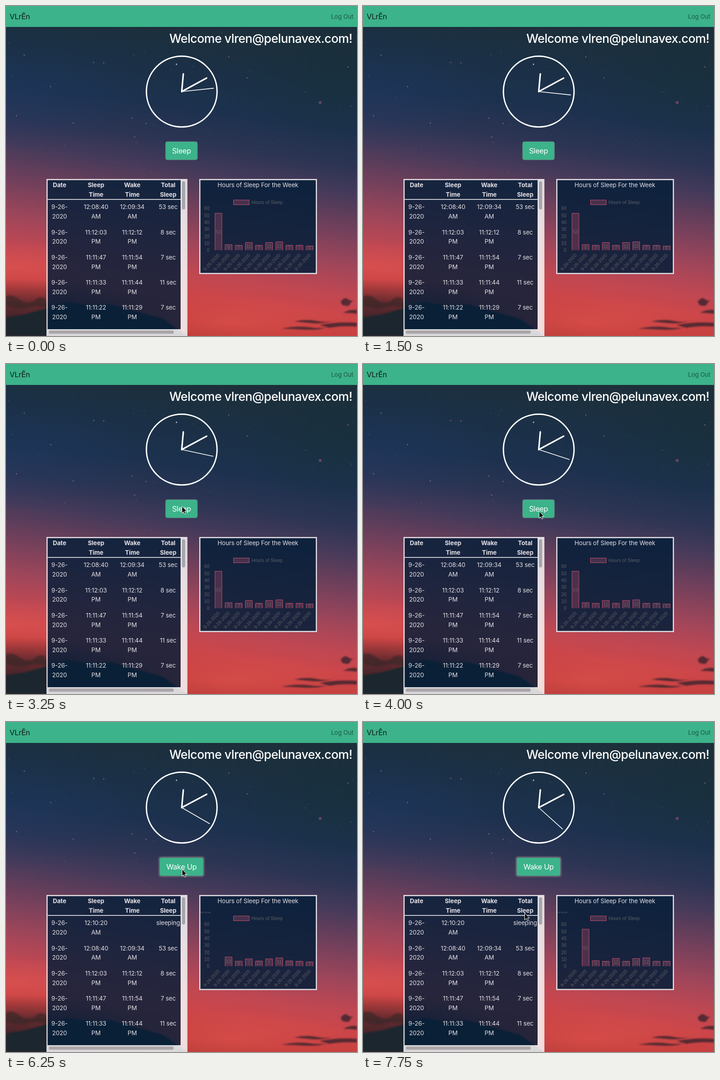
An HTML page for the animation above (8 s loop, 772 by 725 pixels).

```html
<!DOCTYPE html>
<html lang="en">
<head>
<meta charset="utf-8">
<title>Sleep log</title>
<style>
html, body { margin: 0; width: 100%; height: 100%; overflow: hidden; background: #1d2f3d; }
svg { display: block; width: 772px; height: 725px; font: 13.3px Inter, sans-serif; font-optical-sizing: none; letter-spacing: -.1px; }
.mid { text-anchor: middle; }
.end { text-anchor: end; }
.head { font-weight: 700; }
.big { font-size: 16.3px; letter-spacing: -.35px; }
.hello { font-size: 26.7px; font-weight: 500; letter-spacing: -.55px; }
.chart { font: 10.35px "Liberation Sans", Arial, sans-serif; letter-spacing: 0; fill: #666; fill-opacity: .88; }
.bar { fill: #ff6384; fill-opacity: .22; stroke: #dc5775; stroke-opacity: .9; stroke-width: .95; }
.hands { stroke: #fff; stroke-linecap: round; }
</style>
</head>
<body>
<svg viewBox="0 0 772 725">
  <defs>
    <linearGradient id="sky" gradientUnits="userSpaceOnUse" x1="386" y1="47" x2="286" y2="725">
      <stop offset="0" stop-color="#1c2f3b"/>
      <stop offset=".12" stop-color="#1b3045"/>
      <stop offset=".25" stop-color="#1c314e"/>
      <stop offset=".36" stop-color="#2c3453"/>
      <stop offset=".45" stop-color="#453a5a"/>
      <stop offset=".57" stop-color="#74405b"/>
      <stop offset=".68" stop-color="#a0465a"/>
      <stop offset=".77" stop-color="#bf4752"/>
      <stop offset=".84" stop-color="#cc4649"/>
      <stop offset=".92" stop-color="#c63f3d"/>
      <stop offset="1" stop-color="#b03835"/>
    </linearGradient>
    <radialGradient id="blue"><stop stop-color="#1c3a66" stop-opacity=".4"/><stop offset="1" stop-color="#1c3a66" stop-opacity="0"/></radialGradient>
    <radialGradient id="teal"><stop stop-color="#17303c" stop-opacity=".6"/><stop offset="1" stop-color="#17303c" stop-opacity="0"/></radialGradient>
    <radialGradient id="glow"><stop stop-color="#e85c55" stop-opacity=".4"/><stop offset="1" stop-color="#e85c55" stop-opacity="0"/></radialGradient>
    <radialGradient id="dusk"><stop stop-color="#2a2027" stop-opacity=".9"/><stop offset=".5" stop-color="#35222a" stop-opacity=".65"/><stop offset="1" stop-color="#4a2730" stop-opacity="0"/></radialGradient>
    <filter id="soft" x="-30%" y="-60%" width="160%" height="220%"><feGaussianBlur stdDeviation="1.5"/></filter>
    <clipPath id="plot"><rect x="428" y="416.7" width="253" height="169"/></clipPath>
  </defs>

  <rect width="772" height="725" fill="url(#sky)"/>
  <ellipse cx="40" cy="200" rx="260" ry="120" fill="url(#blue)"/>
  <ellipse cx="740" cy="160" rx="240" ry="150" fill="url(#teal)"/>
  <ellipse cx="20" cy="570" rx="200" ry="55" fill="url(#glow)"/>
  <ellipse cx="500" cy="695" rx="260" ry="60" fill="url(#glow)"/>
  <g id="stars"></g>
  <ellipse cx="20" cy="700" rx="330" ry="100" fill="url(#dusk)"/>
  <g filter="url(#soft)">
    <path d="M0 638Q14 632 30 645T62 648Q72 636 86 642L92 664Q64 656 48 662T0 658Z" fill="#35242a" opacity=".6"/>
    <path d="M0 684L40 678L90 664L135 650L175 657L230 655L290 672L345 687L399 725H0Z" fill="#1f272d"/>
    <g fill="#43262f" opacity=".85">
      <path d="M736 650Q744 638 752 644T765 646Q758 651 756 656T740 657Z"/>
      <path d="M634 693Q660 687 684 692T728 689Q700 699 676 697T634 693Z"/>
      <path d="M606 709Q640 702 668 706T712 704Q690 713 656 711T606 709Z"/>
      <path d="M690 701Q726 693 772 696V704Q736 702 712 707Z"/>
      <path d="M742 674Q756 666 772 668V676Q758 674 742 674Z"/>
    </g>
  </g>

  <rect width="772" height="46" fill="#3cb38a"/>
  <text x="8" y="28.5" class="big" fill="#111b18">VLrĔn</text>
  <text x="764" y="27.7" class="end" fill="#1d5744">Log Out</text>
  <text x="761.5" y="81" class="end hello" fill="#fff">Welcome vlren@pelunavex.com!</text>

  <circle cx="386.5" cy="188" r="77.7" fill="none" stroke="#fff" stroke-width="3"/>
  <g class="hands" id="hands"></g>
  <g id="button"></g>

  <rect x="91.5" y="382.5" width="292.5" height="327.5" fill="#071f3a" fill-opacity=".84"/>
  <path d="M89 380H399V725H89ZM91.5 382.5V710H384V382.5Z" fill="#fafafa" fill-opacity=".85" fill-rule="evenodd"/>
  <path d="M396.6 382V722.5H91.5" fill="none" stroke="#cfc6ca" stroke-opacity=".5" stroke-width=".8"/>
  <rect x="94" y="713" width="275" height="7" rx="3.5" fill="#aca5a9"/>
  <rect id="thumb" x="387" y="385" width="7" height="62" rx="3.5" fill="#a7a5ac"/>
  <rect x="91.5" y="424" width="292.5" height="1.8" fill="#d7d9de"/>
  <g id="table" class="mid" fill="#e4e0e5"></g>

  <rect x="426.3" y="381.3" width="256.4" height="206.4" fill="#071f3a" fill-opacity=".88" stroke="#e0dce1" stroke-width="2.6"/>
  <text x="554" y="398.3" class="mid" fill="#e4e0e5">Hours of Sleep For the Week</text>
  <g class="chart" clip-path="url(#plot)">
    <rect x="500.4" y="426.2" width="34.6" height="10.4" class="bar"/>
    <text x="540" y="435">Hours of Sleep</text>
    <g id="axes"></g>
    <g id="bars"></g>
  </g>
  <path id="cursor" d="M0 0V15.3L3.5 12.1L5.8 17.3L8.4 16.2L6.1 11.1H10.8Z" fill="#0a0a0a" stroke="#fff" stroke-width="1" stroke-linejoin="round"/>
</svg>
<script>
const LOOP = 8000, STEP = 250, WAKE = 6250;
const el = id => document.getElementById(id);
const text = (x, y, s, attrs = "") => `<text x="${x}" y="${y}" ${attrs}>${s}</text>`;

const before = [53, 8, 7, 11, 7, 11, 12, 7, 7, 6];
const after = [null, ...before.slice(0, 9)];
const barX = i => 459.7 + i * 22.27;
const barY = v => 536.5 - v * 1.533;

const sleeps = [
  ["12:10:20 AM", "", "sleeping"],
  ["12:08:40 AM", "12:09:34 AM", "53 sec"],
  ["11:12:03 PM", "11:12:12 PM", "8 sec"],
  ["11:11:47 PM", "11:11:54 PM", "7 sec"],
  ["11:11:33 PM", "11:11:44 PM", "11 sec"],
  ["11:11:22 PM", "11:11:29 PM", "7 sec"]
];
const columns = [117.7, 198, 277.7, 356.7];

// Pointer stops: start time, x, y
const stops = [
  [2250, 700.5, 550], [2500, 521.5, 625.5], [2750, 405.5, 474.5], [3000, 330, 278.5],
  [3250, 387, 312.5], [3500, 387.3, 325.5], [3750, 387.3, 325], [4000, 387.3, 323.5],
  [7250, 383, 338], [7500, 372.5, 371.5], [7750, 355.5, 419.5]
];

function drawStars() {
  let seed = 11;
  const rnd = () => (seed = seed * 16807 % 2147483647) / 2147483647;
  const dot = (x, y, r, c, o) => `<circle cx="${x}" cy="${y}" r="${r}" fill="${c}" opacity="${o}"/>`;
  let out = "";
  for (let i = 0; i < 110; i++)
    out += dot(rnd() * 772, 50 + rnd() * 320, .4 + rnd() * .5, "#c3a8b8", .15 + rnd() * .3);
  const bright = [[40, 108], [193, 124], [215, 125], [277, 246], [283, 288], [23, 241], [752, 134],
    [490, 112], [530, 158], [98, 177], [148, 257], [308, 258]];
  bright.forEach(([x, y]) => out += dot(x, y, 1.2, "#c78a98", .65));
  out += dot(375, 128, 1.5, "#a9c9ff", 1) + dot(691, 212, 3.2, "#a5587c", .55);
  el("stars").innerHTML = out;
}

function drawAxes() {
  let out = "";
  for (let v = 0; v <= 60; v += 10) out += text(447.5, barY(v) + 3.7, v, 'class="end"');
  for (let i = 0; i < 10; i++)
    out += text(0, 3.6, "9-26-2020", `class="end" transform="translate(${barX(i) + 8.3} 545.5) rotate(-47)"`);
  el("axes").innerHTML = out;
}

function drawHands(t) {
  const sec = 14 + Math.floor((t + 500) / 1000);
  const min = 10 + sec / 60;
  const hand = (deg, len, w) =>
    `<path d="M386.5 188v${-len}" stroke-width="${w}" transform="rotate(${deg} 386.5 188)"/>`;
  el("hands").innerHTML = hand(min / 2, 39, 3.3) + hand(min * 6, 62.3, 3.3) + hand(sec * 6, 70.5, 1.6);
}

function drawButton(awake, focus) {
  const w = awake ? 71 : 97, x = 386 - w / 2;
  const ring = focus ? `<rect x="${x - 2.8}" y="294.7" width="${w + 5.6}" height="46.6" rx="6" fill="#5b5869" fill-opacity=".88"/>` : "";
  el("button").innerHTML = ring +
    `<rect x="${x + .4}" y="297.9" width="${w - .8}" height="40.2" rx="4" fill="#3cb38a" stroke="#6c757d" stroke-width=".9"/>` +
    text(386, 324.3, awake ? "Sleep" : "Wake Up", 'class="mid big" fill="#fff"');
}

function drawTable(awake) {
  const cell = (x, y, s, cls = "") =>
    s.split(" ").map((part, i) => text(x, y + i * 20.7, part, cls)).join("");
  let out = ["Date", "Sleep Time", "Wake Time", "Total Sleep"]
    .map((s, i) => cell(columns[i], 398.4, s, 'class="head"')).join("");
  const first = awake ? 1 : 0;
  sleeps.slice(first, first + 5).forEach(([from, to, total], i) => {
    const y = 446.4 + i * 55.2;
    out += cell(columns[0], y, "9-26- 2020") + cell(columns[1], y, from) +
      cell(columns[2], y, to) + text(columns[3], y, total);
  });
  el("table").innerHTML = out;
  el("thumb").setAttribute("height", awake ? 62 : 60);
}

function drawBars(t, awake) {
  const p = Math.min(1, Math.max(0, (t - WAKE + 30) / 1000));
  const ease = 1 - (1 - p) ** 4;
  const shown = awake ? before : after;
  let out = awake ? "" : text(450.5 - ease, 420.4, "undefined", 'class="end"');
  shown.forEach((v, i) => {
    if (v === null) return;
    const x = barX(i), top = barY(before[i] + (v - before[i]) * ease);
    out += `<path class="bar" d="M${x} 536.5V${top}h15.2V536.5"/>` +
      text(x + 7.6, (top + 536.5) / 2 + 3.7, v, 'class="mid"');
  });
  el("bars").innerHTML = out;
}

function drawCursor(t) {
  const stop = stops.filter(s => s[0] <= t).pop();
  const [, x, y] = stop || [0, -50, -50];
  el("cursor").setAttribute("transform", `translate(${x} ${y})`);
}

function draw(t) {
  const awake = t < WAKE;
  drawHands(t);
  drawButton(awake, t >= 6000);
  drawTable(awake);
  drawBars(t, awake);
  drawCursor(t);
}

let last = -1;
function tick() {
  const t = Math.floor(performance.now() % LOOP / STEP) * STEP;
  if (t !== last) draw(last = t);
  requestAnimationFrame(tick);
}

drawStars();
drawAxes();
tick();
</script>
</body>
</html>
```
